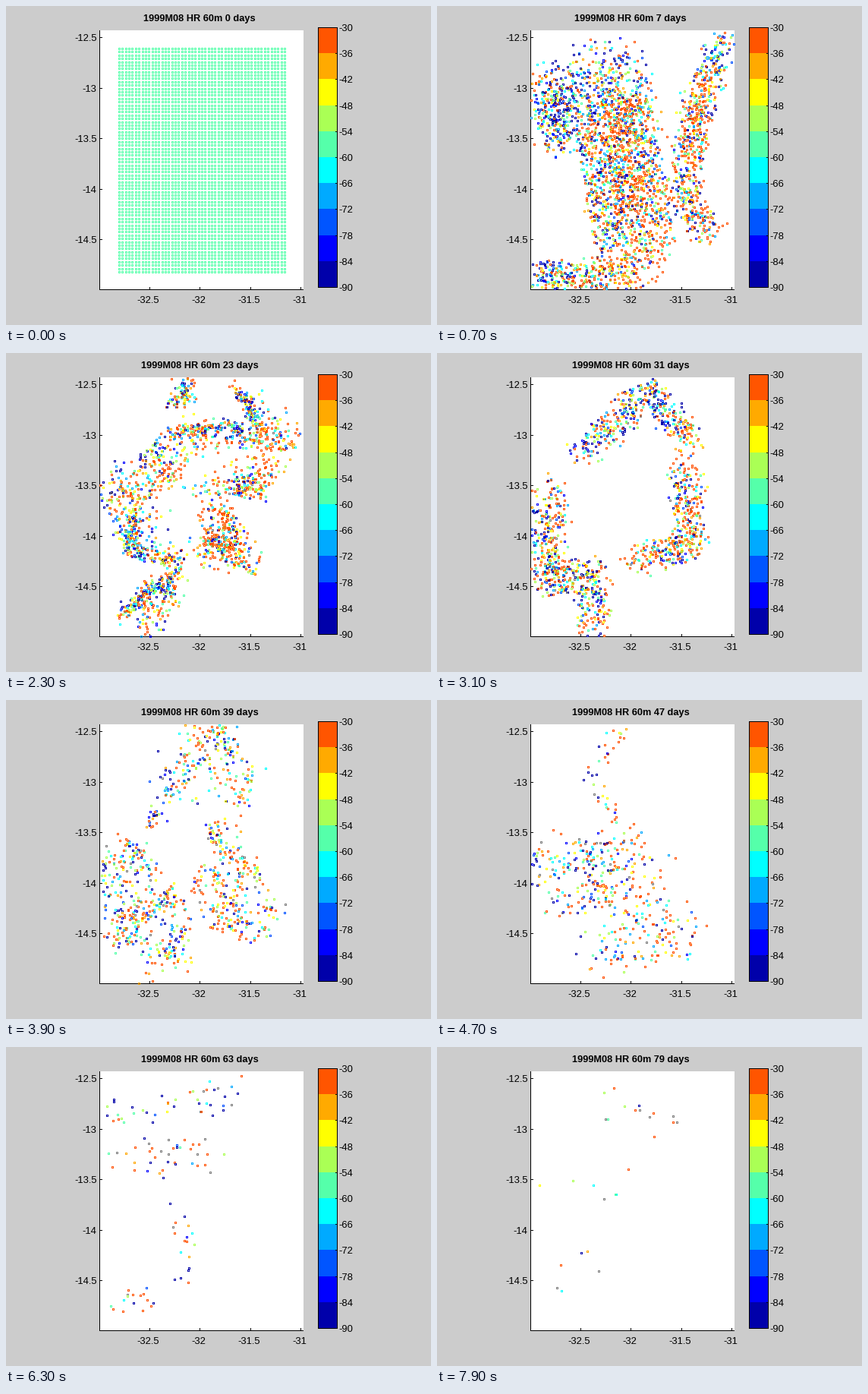
Write a matplotlib script that moves like this. It is 560x420 px and loops after 8 s.

```python
import numpy as np
import matplotlib.pyplot as plt
from matplotlib.animation import FuncAnimation
from matplotlib.colors import to_rgba_array

W, H, DPI = 560, 420, 80
PT = 72 / DPI                      # one pixel in points
DAYS = 80
LEFT, TOP, RIGHT, BOTTOM = 123, 32, 392, 373
BANDS = ["#ff5500", "#ffaa00", "#ffff00", "#aaff55", "#55ffaa",
         "#00ffff", "#00aaff", "#0055ff", "#0000ff", "#0000aa"]
PALETTE = to_rgba_array(BANDS + ["#808080"])
GREY = len(BANDS)
COLS, ROWS = 51, 68
rng = np.random.default_rng(8)

# Shape of the drifting cloud: by day, filaments of (radius, point, point, ...)
FILAMENTS = {
    7: [(56, (222, 85), (262, 320)), (28, (152, 95), (158, 175)),
        (22, (375, 45), (335, 165), (325, 240), (355, 300)),
        (22, (130, 358), (260, 350))],
    15: [(34, (160, 160), (340, 125)), (46, (190, 200), (275, 260)),
         (24, (225, 310), (170, 365)), (26, (340, 40), (350, 130)),
         (16, (205, 45), (238, 55))],
    31: [(23, (150, 180), (145, 300), (205, 290), (207, 360)),
         (20, (190, 130), (280, 50), (335, 120)),
         (22, (325, 150), (335, 250), (260, 272))],
    47: [(11, (245, 33), (200, 100), (245, 165)),
         (54, (150, 230), (270, 225)), (42, (215, 320), (320, 300))],
    63: [(26, (125, 90), (330, 55)), (28, (140, 145), (280, 140)),
         (14, (228, 205), (242, 315)), (22, (135, 350), (205, 320))],
    79: [(32, (220, 70), (315, 95)), (28, (140, 190), (270, 170)),
         (30, (160, 305), (235, 285))],
}


def alive(day):
    """Particles still in view: a logistic decline."""
    return int(COLS * ROWS / (1 + np.exp((day - 26) / 11)))


def inside(x, y):
    return (x > LEFT) & (x < RIGHT) & (y > TOP) & (y <= BOTTOM)


def strew(n, radius, *spine):
    """Scatter points in discs along a polyline; n is per unit of area."""
    pts = np.array(spine, float)
    s = np.append(0, np.cumsum(np.hypot(*np.diff(pts, axis=0).T)))
    count = int(n * radius * (2 * s[-1] + np.pi * radius))
    t = rng.uniform(0, s[-1], count)
    r = radius * np.sqrt(rng.random(count)) + rng.normal(0, 4, count)
    angle = rng.uniform(0, 2 * np.pi, count)
    return np.column_stack([np.interp(t, s, pts[:, 0]) + r * np.cos(angle),
                            np.interp(t, s, pts[:, 1]) + r * np.sin(angle)])


def depths(xy):
    """Widely mixed depths: deeper to the west and north, with patches."""
    x, y = xy.T
    trend = 12 * np.tanh((x - 190) / 50) - 18 * np.exp(-((y - 65) / 45) ** 2)
    patch = 14 * np.sin(x / 23 + y / 41) * np.sin(y / 27 - x / 60)
    return rng.normal(-50, 34, len(xy)) + trend + patch


def cloud(day):
    """Rows of x, y, depth."""
    xy = np.vstack([strew(0.12, *f) for f in FILAMENTS[day]])
    xy = rng.permutation(xy[inside(*xy.T)])[:alive(day)]
    return np.column_stack([xy, depths(xy)])


def release():
    gx, gy = np.meshgrid(np.linspace(149, 367, COLS),
                         np.linspace(56, 350, ROWS))
    return np.column_stack([gx.ravel(), gy.ravel(), np.full(gx.size, -57.0)])


def link(a, b, t0, t1):
    """Join each row of b to a near, unused row of a; the rest die off."""
    n = len(a)
    parent = np.zeros(len(b), int)
    free = np.ones(n, bool)
    for i in rng.permutation(len(b)):
        gap = ((a[:, :2] - b[i, :2]) ** 2).sum(1)
        parent[i] = np.where(free, gap, np.inf).argmin()
        free[parent[i]] = False
    end = a.copy()
    end[parent] = b
    kept = a[parent, :2]
    for i in np.flatnonzero(free):
        near = ((kept - a[i, :2]) ** 2).sum(1).argmin()
        end[i, :2] += b[near, :2] - kept[near] + rng.normal(0, 20, 2)
    end[free, 2] = depths(end[free, :2])
    death = np.full(n, np.inf)
    death[free] = rng.uniform(t0, t1, free.sum())
    return t0, t1, a, end, death, rng.random(n)


STOPS = [0, *FILAMENTS]
CLOUDS = [release(), *map(cloud, FILAMENTS)]
LEGS = [link(*leg) for leg in zip(CLOUDS, CLOUDS[1:], STOPS, STOPS[1:])]


def particles(day):
    """Pixel centres and colours of all visible particles on one day."""
    leg = min(np.searchsorted(STOPS, day, side="right") - 1, len(LEGS) - 1)
    t0, t1, a, b, death, luck = LEGS[leg]
    u = (day - t0) / (t1 - t0)
    swell = np.sin(np.pi * u)
    x, y, depth = (a + (b - a) * u).T
    dx = 9 * np.sin(y / 28 + 0.45 * day) + 5 * np.sin((x + y) / 17 - 0.6 * day)
    dy = 9 * np.sin(x / 31 - 0.4 * day) + 5 * np.sin((x - y) / 19 + 0.5 * day)
    x, y = np.rint(x + swell * dx), np.rint(y + swell * dy)
    depth = depth + 25 * swell * np.sin(1.1 * day + 2 * np.pi * luck)
    band = np.clip((-30 - depth) // 6, 0, GREY - 1).astype(int)
    band[luck < 0.25 * (day / DAYS) ** 3] = GREY
    show = (death > day) & inside(x, y)
    return np.column_stack([x, y])[show] + 0.5, PALETTE[band[show]]


fig = plt.figure(figsize=(W / DPI, H / DPI), dpi=DPI, facecolor="#cccccc")
ax = fig.add_axes([0, 0, 1, 1])
ax.set_xlim(0, W)
ax.set_ylim(H, 0)
ax.axis("off")


def box(x, y, w, h, color):
    ax.add_patch(plt.Rectangle((x, y), w, h, fc=color, lw=0,
                               antialiased=False))


def label(x, y, s, ha="center", size=13, **kw):
    return ax.text(x, y + 4.6, s, ha=ha, va="baseline", fontsize=size * PT,
                   family="Liberation Sans", **kw)


box(LEFT, TOP, RIGHT - LEFT, BOTTOM - TOP + 1, "white")
box(LEFT, TOP, 1, BOTTOM - TOP + 1, "black")
box(LEFT, BOTTOM, RIGHT - LEFT, 1, "black")
for i in range(5):
    y = 41.5 + 66.5 * i
    box(LEFT, int(y), 4, 1, "black")
    label(119.5, y, f"{-12.5 - i / 2:g}", "right")
for i in range(4):
    x = 189 + 66.5 * i
    box(int(x), BOTTOM - 3, 1, 4, "black")
    label(x - 1.5, 386.5, f"{-32.5 + i / 2:g}")

BAR_X, BAR_Y, BAR_W, STEP = 411, 28, 26, 34.2
edges = [round(BAR_Y + STEP * i) for i in range(len(BANDS) + 1)]
for top, bottom, color in zip(edges, edges[1:], BANDS):
    box(BAR_X, top, BAR_W, bottom - top, color)
for x in (BAR_X, BAR_X + BAR_W - 1):
    box(x, BAR_Y, 1, edges[-1] - BAR_Y + 1, "black")
for y in (edges[0], edges[-1]):
    box(BAR_X, y, BAR_W, 1, "black")
for i, y in enumerate(edges):
    box(BAR_X + BAR_W - 3, y, 3, 1, "black")
    label(438.5, y + 0.5, str(-30 - 6 * i), "left")

title = label(255, 15.8, "", size=12.8, weight="bold")
dots = ax.scatter([], [], s=(2 * PT) ** 2, marker="s", linewidths=PT,
                  antialiased=False, zorder=3)
dots.set_facecolor("none")
dots.set_snap(False)


def draw(day):
    xy, colors = particles(day)
    dots.set_offsets(xy)
    dots.set_edgecolor(colors)
    title.set_text(f"1999M08 HR 60m {day} days")
    return dots, title


anim = FuncAnimation(fig, draw, frames=DAYS, interval=100, repeat=True,
                     repeat_delay=0, blit=False)
plt.show()
```
